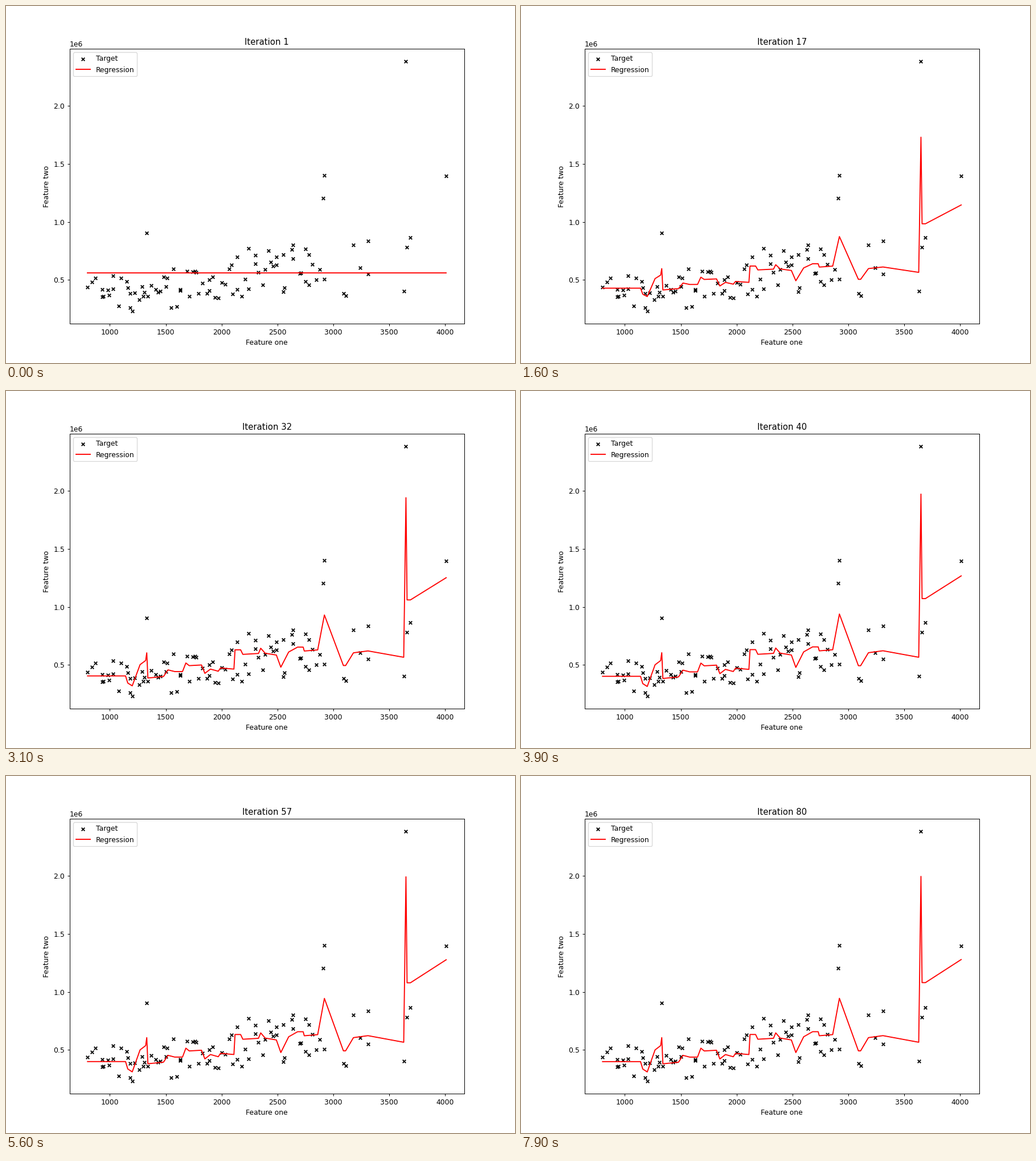
Animation, 894 px wide and 626 px high, one loop 8 s. Source, as a matplotlib script:

```python
import matplotlib.pyplot as plt
import numpy as np
from matplotlib.animation import FuncAnimation

FRAMES, INTERVAL = 80, 100
LEARNING_RATE = 0.1
MEAN = 561e3

# Points that stand apart from the crowd: feature, target in thousands.
outliers = np.array([
    (800, 440), (1200, 230), (1330, 903), (2910, 1203), (2920, 1399),
    (3090, 384), (3110, 364), (3180, 800), (3240, 603), (3310, 553),
    (3310, 836), (3630, 401), (3650, 2384), (3660, 782), (3690, 866),
    (4010, 1394)])

# Corners of the fully trained curve, same units.
corners = np.array([
    (800, 399), (1140, 399), (1160, 335), (1200, 310), (1270, 500),
    (1320, 537), (1330, 606), (1340, 380), (1480, 394), (1520, 453),
    (1580, 438), (1650, 438), (1680, 515), (1710, 491), (1820, 497),
    (1850, 422), (1900, 460), (1970, 441), (1990, 470), (2110, 460),
    (2120, 633), (2170, 633), (2190, 592), (2330, 600), (2350, 647),
    (2390, 602), (2490, 586), (2530, 477), (2600, 613), (2680, 657),
    (2730, 657), (2740, 622), (2860, 632), (2920, 945), (3090, 492),
    (3110, 492), (3180, 606), (3310, 623), (3630, 566), (3650, 1996),
    (3660, 1080), (3690, 1080), (4010, 1279)])


def crowd(count=83, seed=4):
    """Evenly spread features with targets inside a slowly rising band."""
    rng = np.random.default_rng(seed)
    x = np.linspace(850, 2910, count) + rng.normal(0, 15, count)
    x = np.round(x, -1).clip(840, 2920)
    low = np.interp(x, [800, 1200, 2000, 2900], [310, 235, 285, 440])
    high = np.interp(x, [800, 1400, 2000, 2150, 2900],
                     [560, 600, 660, 830, 830])
    return x, low + (high - low) * rng.beta(1.2, 1.4, count)


def curve(n):
    """Start at the mean; each iteration removes a share of the residual."""
    learned = 1 - (1 - LEARNING_RATE) ** (n - 1)
    return MEAN + (corners[:, 1] * 1e3 - MEAN) * learned


crowd_x, crowd_y = crowd()
feature = np.append(crowd_x, outliers[:, 0])
target = np.append(crowd_y, outliers[:, 1]) * 1e3

fig, ax = plt.subplots(figsize=(10.0001, 7.0023), dpi=89.4)
ax.scatter(feature, target, s=20, marker="x", color="black", label="Target")
line, = ax.plot(corners[:, 0], curve(1), color="red", label="Regression")
title = ax.set_title("Iteration 1")
ax.set_xlabel("Feature one")
ax.set_ylabel("Feature two")
ax.legend(loc="upper left")


def update(frame):
    n = frame + 1
    line.set_ydata(curve(n))
    title.set_text(f"Iteration {n}")
    return line, title


anim = FuncAnimation(fig, update, frames=FRAMES, interval=INTERVAL,
                     repeat=True, repeat_delay=0)
plt.show()
```
